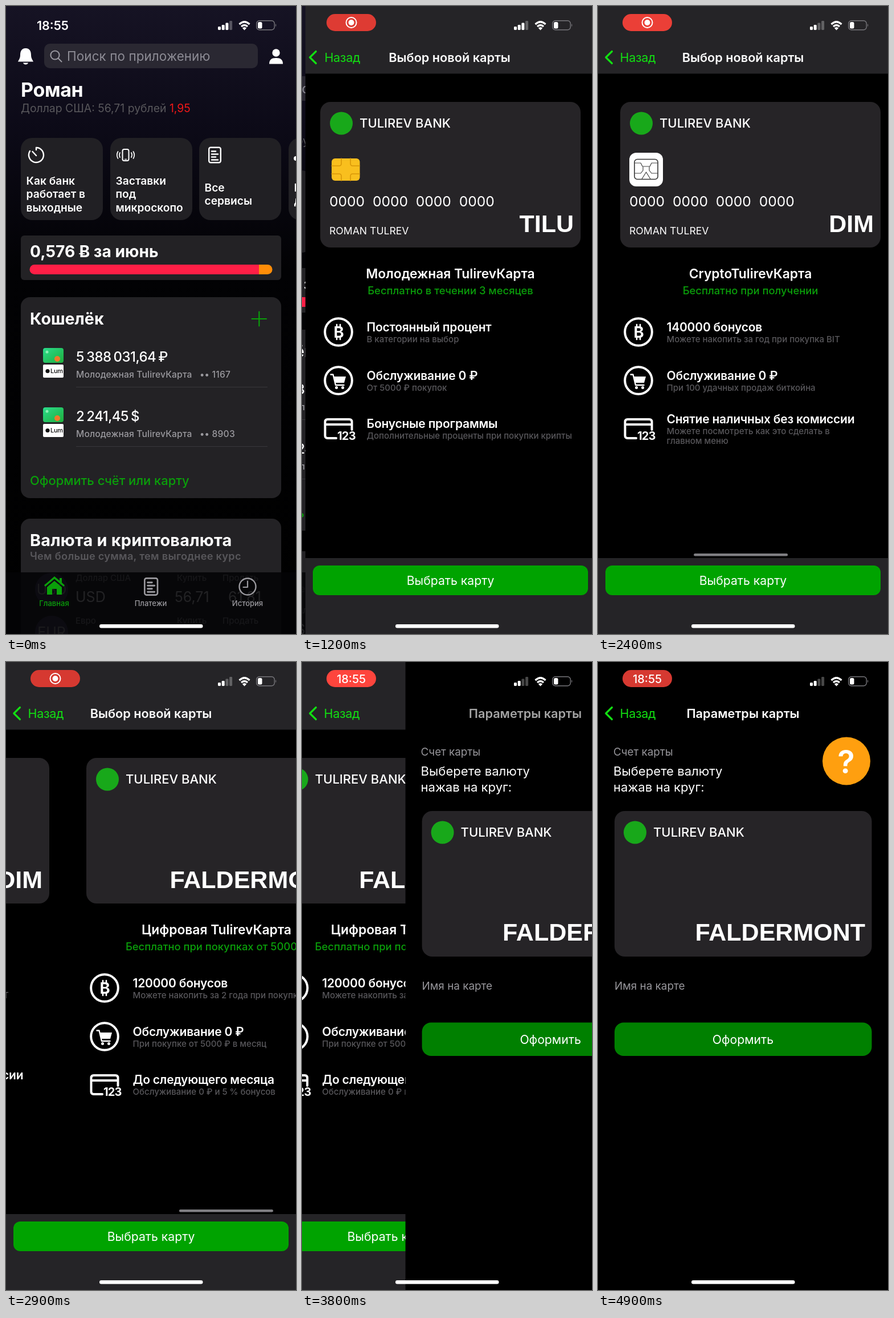
Recreate the animation shown at these times as an HTML page. Size 509 by 1100 pixels, loop 5000 ms.

```html
<!DOCTYPE html>
<html lang="ru">
<head>
<meta charset="utf-8">
<title>Банковское приложение</title>
<style>
html, body { margin: 0; width: 100%; height: 100%; overflow: hidden; background: #000; }
svg { display: block; width: 509px; height: 1100px; }
text { font-family: Inter, "Noto Sans", "DejaVu Sans", sans-serif; white-space: pre; }
text.mark { font-family: "Liberation Sans", Arial, sans-serif; font-weight: 700; }
</style>
</head>
<body>
<script>
const W = 509, H = 1100, LOOP = 5000, STEP = 100;
const GREEN = '#0a9f0a', PANEL = '#232225', CARD = '#262427', BAR = '#252427', GREY = '#58575b', SOFT = '#9b9a9f';

// ---- drawing helpers; text is placed by the middle of its capitals ----
const T = (x, y, size, str, fill = '#fff', weight = 400, ls = 0, anchor = 'start') =>
  `<text x="${x}" y="${y + size * .36}" font-size="${size}" fill="${fill}" font-weight="${weight}" letter-spacing="${ls}em" text-anchor="${anchor}">${str}</text>`;
const C = (x, y, size, str, fill, weight, ls) => T(x, y, size, str, fill, weight, ls, 'middle');
const R = (x, y, w, h, r, fill, extra = '') =>
  `<rect x="${x}" y="${y}" width="${w}" height="${h}" rx="${r}" fill="${fill}" ${extra}/>`;
const O = (x, y, r, fill, extra = '') => `<circle cx="${x}" cy="${y}" r="${r}" fill="${fill}" ${extra}/>`;
const L = (d, color, width = 2, extra = '') =>
  `<path d="${d}" fill="none" stroke="${color}" stroke-width="${width}" stroke-linecap="round" stroke-linejoin="round" ${extra}/>`;
const P = (d, fill) => `<path d="${d}" fill="${fill}"/>`;
const G = (x, y, body, id = '') => `<g ${id && `id="${id}"`} transform="translate(${x} ${y})">${body}</g>`;
const mark = (x, y, str) =>
  `<text class="mark" x="${x}" y="${y + 14.5}" font-size="43" fill="#fff" text-anchor="end">${str}</text>`;

const docIcon = (x, y, c, k = 1) => `<g transform="translate(${x} ${y}) scale(${k})">` +
  R(1.2, 1.2, 20.6, 26.6, 3, 'none', `stroke="${c}" stroke-width="2.4"`) +
  L('M6 8H13M6 13H17M6 18H13M6 23H17', c, 2.6) + '</g>';

// ---- home screen ----
const tile = (x, lines, y) => R(x, 231, 144, 144, 20, '#212024') +
  lines.map((s, i) => T(x + 9.5, y + i * 23.3, 19.2, s, '#fff', 600)).join('');

const account = (y, sum, digits) =>
  R(65, y - 15, 36, 26, 4, 'url(#mint)') + O(90, y + 4, 5, '#f0792b') + O(72, y - 8, 2.5, '#8af0b4') +
  R(65, y + 14, 36, 23, 2, '#fff') + O(73, y + 25.5, 3.6, '#111') + T(78, y + 25.5, 11, 'Lum', '#111', 500, -.03) +
  `<g word-spacing="-1.8">${T(123, y, 24, sum, '#fff', 500, -.023)}</g>` +
  T(123, y + 31, 15.6, 'Молодежная TulirevКарта', SOFT, 500, .01) +
  T(340, y + 31, 15.6, '•• ' + digits, SOFT, 500, .015) +
  R(123, y + 53, 336, 1, 0, '#38373b');

const rate = (y, code, name, buy, sell) =>
  O(80, y + 20, 29, '#4a4266') + C(80, y + 20, 25, code, '#bbb') +
  T(122, y, 15, name, SOFT, 500) + T(300, y, 15, 'Купить', SOFT, 500) + T(380, y, 15, 'Продать', SOFT, 500) +
  T(122, y + 33, 25, code, '#fff') + T(296, y + 33, 25, buy) + T(390, y + 33, 25, sell);

const home = R(0, 0, W + 200, H, 0, 'url(#night)') + G(0, 0,
  P('M34.500 74C27 74 25 80 25 86C25 92 22 95 21 97.500H48C47 95 44 92 44 86C44 80 42 74 34.500 74ZM30 99.500H39C38 103.500 31 103.500 30 99.500Z', '#fff') +
  R(67, 66, 375, 43, 10, '#2a2832') +
  O(86, 86, 7.6, 'none', 'stroke="#9b9aa2" stroke-width="2"') + L('M91.500 91.500L97.500 97.500', '#9b9aa2') +
  T(107, 88, 22.4, 'Поиск по приложению', '#8d8c95', 400, .005) +
  O(474, 82, 6.7, '#fff') + P('M462 101.500C462 94 466 91 474 91S486 94 486 101.500Z', '#fff') +
  T(26, 147, 34, 'Роман', '#fff', 700, -.01) +
  '<g id="usd">' + T(26, 179.5, 19.4, 'Доллар США: 56,71 рублей <tspan fill="#f01818">1,95</tspan>', GREY) + '</g>' +
  '<g id="eur">' + T(26, 179.5, 19.4, 'Евро: 59,33 рублей <tspan fill="#16e436">+2,46</tspan>', GREY) + '</g>' +
  tile(26, ['Как банк', 'работает в', 'выходные'], 306) +
  L('M53 248A13 13 0 1 1 42 254M53 248V252M53 262L46.500 255', '#fff', 2.4) +
  tile(183, ['Заставки', 'под', 'микроскопо'], 306) +
  R(204.5, 251, 11, 20, 3, 'none', 'stroke="#fff" stroke-width="2"') + L('M208.500 268.500H211.500', '#fff', 1.4) +
  L('M200 257Q198 261 200 265M196.500 255Q193 261 196.500 267M220 257Q222 261 220 265M223.500 255Q227 261 223.500 267', '#fff', 1.7) +
  tile(339, ['Все', 'сервисы'], 318) + docIcon(355, 246.5, '#fff') +
  tile(496, ['Мои', 'данные'], 318) + O(509, 267, 4, '#fff') +
  R(26, 402, 457, 78, 6, PANEL) + T(42, 430, 28.2, '0,576 Ƀ за июнь', '#fff', 700) +
  P('M444 453H50A8.500 8.500 0 0 0 50 470H444Z', '#ff1f46') + P('M444 453H459A8.500 8.500 0 0 1 459 470H444Z', '#ff8d08') +
  R(26, 510, 457, 352, 16, PANEL) + T(42, 548, 28.6, 'Кошелёк', '#fff', 700) +
  L('M431.500 548H457M444.300 535.500V560.500', GREEN, 2.2) +
  account(614, '5 388 031,64 ₽', '1167') + account(718, '2 241,45 $', '8903') +
  T(42, 831, 21.9, 'Оформить счёт или карту', GREEN, 500) +
  R(26, 898, 457, 420, 16, PANEL) + T(42, 935.5, 28.8, 'Валюта и криптовалюта', '#fff', 700, .008) +
  T(42, 963.5, 18.2, 'Чем больше сумма, тем выгоднее курс', GREY, 600, .015) +
  rate(1002, 'USD', 'Доллар США', '56,71', '61,81') + rate(1077, 'EUR', 'Евро', '59,33', '64,20'), 'feed') +
  R(0, 992, W + 200, 108, 0, 'rgba(4,4,6,.88)') +
  P('M85 999L67 1014.500L69 1017L85 1003.500L101 1017L103 1014.500L98 1010V1002H94V1006.500ZM72 1018L85 1007L98 1018V1031H89V1021H81V1031H72Z', GREEN) +
  docIcon(242, 1001, SOFT, 1.1) +
  O(424, 1017, 14.5, 'none', `stroke="${SOFT}" stroke-width="2.4"`) + L('M424 1007.500V1018H416.500', SOFT, 2.2) +
  C(84.5, 1046, 13, 'Главная', GREEN, 500) + C(254, 1046, 13, 'Платежи', SOFT, 500) + C(424, 1046, 13, 'История', SOFT, 500);

// ---- card picker ----
const ring = (x, y) => O(x, y, 23.8, 'none', 'stroke="#fff" stroke-width="4"');
const coin = ring(32, 571) + C(32.5, 571, 27.5, 'B', '#fff', 700) +
  L('M29 558V562M35 558V562M29 580V584M35 580V584', '#fff', 2.6);
const cart = ring(32, 656) + P('M23 649H45L42 660H26Z', '#fff') +
  L('M18.500 645.500H22.500L27 664H41.500', '#fff', 2.4) + O(28.500, 668.500, 2.5, '#fff') + O(39.500, 668.500, 2.5, '#fff');
const plastic = L('M28 757H13Q8.500 757 8.500 752.500V728.500Q8.500 724 13 724H51Q55.500 724 55.500 728.500V742M9 733H55', '#fff', 4) +
  T(30, 752.5, 20, '123', '#fff', 700, -.04);

const goldChip = R(20, 267, 49.5, 39, 6, '#f9bf1e') +
  L('M20 280H33Q37 280 37 276V267M69 280H57Q53 280 53 276V267M20 294H33Q37 294 37 298V306M69 294H57Q53 294 53 298V306', '#d99708', 1.6);
const lineChip = R(16, 257, 59, 59, 12, '#fff') + R(25, 268.5, 41, 35, 5, 'none', 'stroke="#333" stroke-width="1.6"') +
  L('M25 275H36L39 281H52L55 275H66M25 293H36L40 288V282M66 293H55L51 288V282M45.500 291L38 303M45.500 291L53 303', '#444', 1.2);

const brand = (x, y) => O(x + 37, y, 20, '#18a81a') + T(x + 69, y, 22, 'TULIREV BANK', '#fff', 500);

const card = ({ chip, net, name, free, rows }, i) => G(26 + i * 522, 0,
  R(0, 168, 457, 255, 18, CARD) + brand(0, 205.5) +
  (chip ? chip + T(16, 342, 24.6, Array(4).fill('0000').join('\u00a0\u00a0')) + T(16, 394, 17.6, 'ROMAN TULREV') : '') +
  mark(445, 381, net) +
  C(228.5, 469, 22.8, name, '#fff', 600) + C(228.5, 498, 18.4, free, GREEN, 500) +
  coin + cart + plastic +
  rows.map(([head, ...sub], k) => {
    const y = 562.5 + k * 84.7 - (sub.length > 1 ? 8 : 0);
    return T(81.5, y, 21, head, '#fff', 600, -.01) +
      sub.map((s, n) => T(81.5, y + 21 + n * 17, 15, s, GREY, 500)).join('');
  }).join(''));

const cards = [
  { chip: goldChip, net: 'TILU', name: 'Молодежная TulirevКарта', free: 'Бесплатно в течении 3 месяцев', rows: [
    ['Постоянный процент', 'В категории на выбор'],
    ['Обслуживание 0 ₽', 'От 5000 ₽ покупок'],
    ['Бонусные программы', 'Дополнительные проценты при покупки крипты']] },
  { chip: lineChip, net: 'DIM', name: 'CryptoTulirevКарта', free: 'Бесплатно при получении', rows: [
    ['140000 бонусов', 'Можете накопить за год при покупка BIT'],
    ['Обслуживание 0 ₽', 'При 100 удачных продаж биткойна'],
    ['Снятие наличных без комиссии', 'Можете посмотреть как это сделать в', 'главном меню']] },
  { net: 'FALDERMONT', name: 'Цифровая TulirevКарта', free: 'Бесплатно при покупках от 5000 ₽', rows: [
    ['120000 бонусов', 'Можете накопить за 2 года при покупка BIT'],
    ['Обслуживание 0 ₽', 'При покупке от 5000 ₽ в месяц'],
    ['До следующего месяца', 'Обслуживание 0 ₽ и 5 % бонусов']] }
];

const picker = R(0, 0, W, H, 0, '#000') + G(0, 0, cards.map(card).join(''), 'strip') +
  R(0, 0, W, 118.5, 0, BAR) + R(0, 959, 165, 4.5, 2.2, '#807f83', 'id="thumb"') +
  R(0, 967, W, 133, 0, BAR) + R(13, 980, 483, 52, 12, '#00a300') +
  C(254.5, 1006.5, 21.2, 'Выбрать карту');

// ---- card settings ----
const settings = R(0, 0, W, H, 0, '#000') +
  T(27, 157, 18.8, 'Счет карты', '#98979c') +
  T(27, 191, 22.1, 'Выберете валюту') + T(27, 219, 22.1, 'нажав на круг:') +
  O(436, 173.5, 42, '#ff9f0f') + C(435.5, 174.5, 56, '?', '#fff', 600) +
  R(29, 261, 451.5, 255, 18, CARD) + brand(28, 298.5) + mark(469, 473, 'FALDERMONT') +
  T(29, 567, 18.9, 'Имя на карте', '#98979c') +
  R(29, 631.5, 451.5, 58.5, 16, '#008000') + C(254.5, 661, 21.2, 'Оформить');

// ---- navigation titles and status bar ----
const LIME = '#12e012';
const nav = L('M24.500 79.500L13.800 90L24.500 100.500', LIME, 3.2, 'id="chevron"') +
  G(0, 0, T(38.5, 90.5, 21.5, 'Назад', LIME, 400, -.015), 'back') +
  G(0, 0, C(254.5, 90.5, 21.7, 'Выбор новой карты', '#fff', 600), 'title1') +
  G(0, 0, C(254.5, 90.5, 21.7, 'Параметры карты', '#fff', 600), 'title2');

const status = '<g id="clock">' + T(54, 34.5, 21.5, '18:55', '#fff', 600) + '</g>' +
  '<g id="pill">' + R(43, 14, 87, 30, 15, '#f00', 'id="pillFill"') +
  '<g id="rec">' + O(86.5, 29, 9, 'none', 'stroke="#fff" stroke-width="2"') + O(86.5, 29, 5, '#fff') + '</g>' +
  '<g id="pillTime">' + C(86.5, 29.5, 20, '18:55', '#fff', 500) + '</g></g>' +
  [6, 9, 12.5, 16].map((h, i) => R(372 + i * 6.7, 42 - h, 5, h, 1.4, '#fff', `id="bar${i}"`)).join('') +
  L('M409.500 32Q418.500 23.500 427.500 32M413 36Q418.500 31 424 36', '#fff', 3.2, 'style="stroke-linecap:butt"') +
  P('M414.800 38.500Q418.500 35.500 422.200 38.500L418.500 42.500Z', '#fff') +
  R(439.7, 25.7, 31.500, 16, 5, 'none', 'stroke="#77767b" stroke-width="1.4"') +
  R(442, 28, 7.5, 11.5, 2.5, '#fff') + P('M473 31Q475.500 33.700 473 36.500Z', '#77767b') +
  R(164, 1083, 181.5, 6.5, 3.2, '#fff');

document.body.insertAdjacentHTML('beforeend', `<svg viewBox="0 0 ${W} ${H}"><defs>
  <linearGradient id="night" x1="0" y1="0" x2="0" y2="1"><stop offset="0" stop-color="#161324"/>
  <stop offset=".2" stop-color="#0c0a17"/><stop offset=".42" stop-color="#020204"/><stop offset="1" stop-color="#000"/></linearGradient>
  <linearGradient id="mint" x1="0" y1="0" x2="1" y2="1"><stop offset="0" stop-color="#2bdc8c"/><stop offset="1" stop-color="#1fae3c"/></linearGradient>
  </defs>${G(0, 0, home, 'home')}${G(0, 0, picker, 'picker')}${G(0, 0, settings, 'settings')}${nav}${status}</svg>`);

// ---- motion ----
const el = id => document.getElementById(id);
const move = (id, x, y = 0) => el(id).setAttribute('transform', `translate(${x} ${y})`);
const fade = (id, a) => el(id).setAttribute('opacity', a);

const PUSH1 = 847, PUSH2 = 3680, SWIPE1 = 1400, SWIPE2 = 2600;
const SWIPE = [0, 60, 211, 420, 499, 507, W];

// critically damped spring
const push = (t, start) => {
  const u = Math.max(0, t - start) * .01826;
  return 1 - (1 + u) * Math.exp(-u);
};
const swipe = (t, start) => {
  const k = Math.min(Math.max((t - start) / 100, 0), SWIPE.length - 1), i = Math.floor(k);
  return SWIPE[i] + ((SWIPE[i + 1] ?? W) - SWIPE[i]) * (k - i);
};
const mix = (a, b, k) => Math.round(a + (b - a) * k);

function draw(t) {
  const a = push(t, PUSH1), b = push(t, PUSH2);
  const scroll = swipe(t, SWIPE1) + swipe(t, SWIPE2);

  move('home', -.3 * W * a);
  move('feed', 0, a > 0 ? 57 : 0);
  move('picker', W * (1 - a) - .3 * W * b);
  move('settings', W * (1 - b));
  move('strip', -scroll);
  el('thumb').setAttribute('x', 3.5 + 164.6 * scroll / W);
  fade('thumb', t >= SWIPE1 ? 1 : 0);

  fade('chevron', Math.min(1, a * 1.6));
  move('back', 78 * (1 - a));
  fade('back', a);
  move('title1', 385 * (1 - a) - 200 * b);
  fade('title1', a * Math.max(0, 1 - 1.6 * b));
  move('title2', 385 * (1 - b));
  fade('title2', b);

  const euro = t >= 500, pill = t >= 300, time = t >= 3000;
  fade('usd', euro ? 0 : 1);
  fade('eur', euro ? 1 : 0);
  fade('clock', pill ? 0 : 1);
  fade('pill', pill ? 1 : 0);
  fade('rec', time ? 0 : 1);
  fade('pillTime', time ? 1 : 0);
  const glow = (1 - Math.cos((t - 900) / 1000 * Math.PI)) / 2;
  el('pillFill').setAttribute('fill', `rgb(${mix(214, 255, glow)},${mix(57, 69, glow)},${mix(49, 61, glow)})`);
  fade('bar2', t < 1400 ? 1 : .28);
  fade('bar3', .28);
}

const begin = performance.now();
(function tick() {
  const t = (performance.now() - begin) % LOOP;
  draw(Math.floor(t / STEP) * STEP);
  requestAnimationFrame(tick);
})();
</script>
</body>
</html>
```
